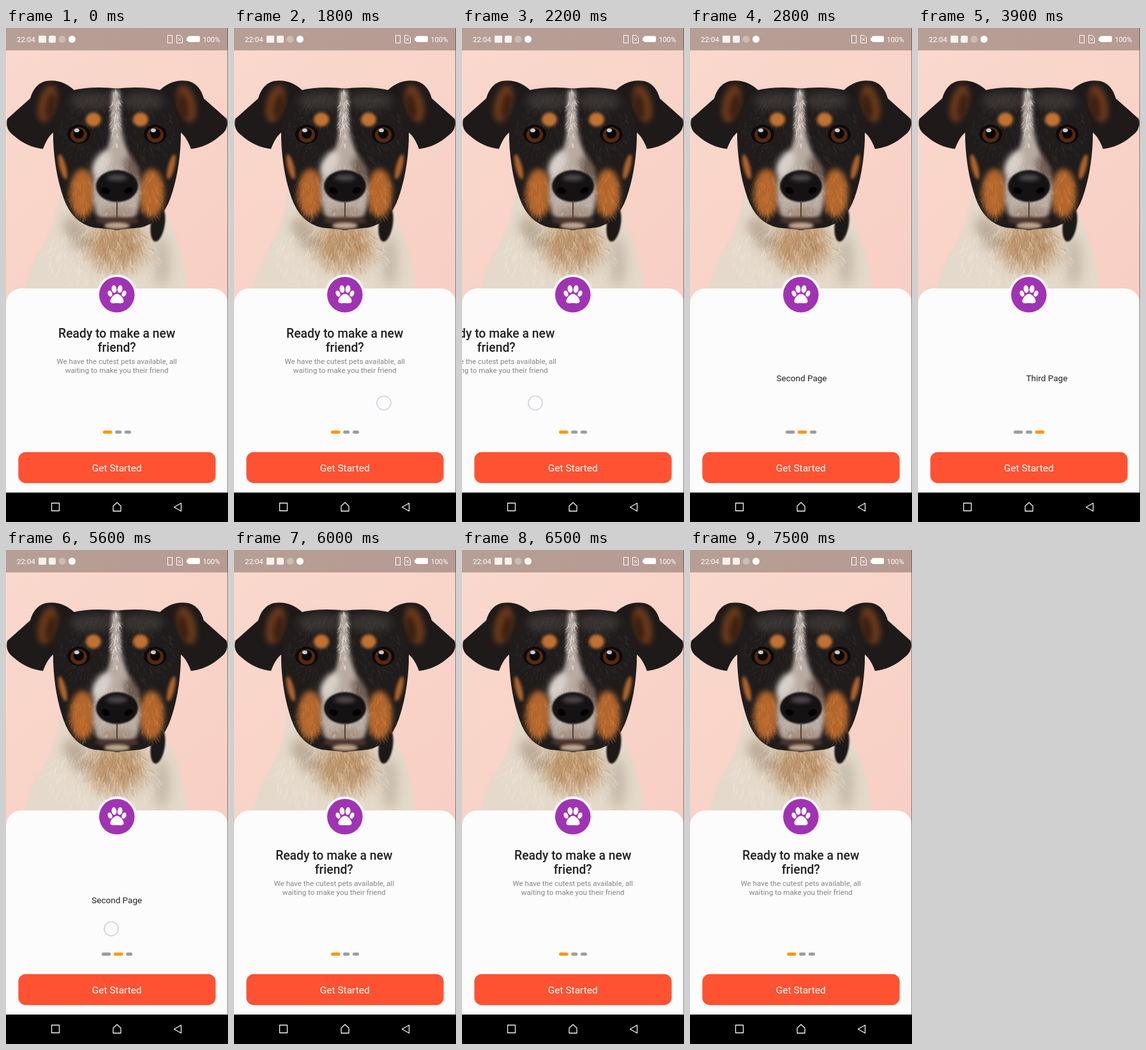
Animation, 348 px wide and 772 px high, one loop 8 s. Source, as an HTML page with a canvas:

```html
<!DOCTYPE html>
<html lang="en">
<head>
<meta charset="utf-8">
<title>Pet onboarding</title>
<style>
html, body { margin: 0; width: 100%; height: 100%; overflow: hidden; background: #000; }
canvas { display: block; width: 348px; height: 772px; }
</style>
</head>
<body>
<canvas id="stage"></canvas>
<script>
const W = 348, H = 772, MID = W / 2, LOOP = 8000;
const DP = W / 360;
const FONT = 'Roboto, Arial, sans-serif';
const INK = '#212121', PAPER = '#fcfcfc';
const dpr = window.devicePixelRatio || 1;

function setup(canvas) {
  canvas.width = W * dpr;
  canvas.height = H * dpr;
  const c = canvas.getContext('2d');
  c.scale(dpr, dpr);
  return c;
}

const ctx = setup(document.getElementById('stage'));
const backdrop = document.createElement('canvas');
const bg = setup(backdrop);

// Drag by the finger, then a spring carries the page the rest of the way
const swipes = [
  { start: 1800, stop: 2200, release: 2400, drag: 120, dir: 1, x: 235, y: 586 },
  { start: 3300, stop: 3700, release: 3700, drag: 117, dir: 1, x: 227, y: 580 },
  { start: 4600, stop: 4900, release: 4900, drag: 153, dir: -1, x: 130, y: 574 },
  { start: 5600, stop: 5800, release: 5800, drag: 209, dir: -1, x: 165, y: 592 }
];
const tap = { start: 6900, stop: 7500, x: 218, y: 698 };

const clamp = v => Math.max(0, Math.min(1, v));

function pulled(s, t) {
  return s.drag * clamp((t - s.start) / (s.stop - s.start)) ** 4;
}

function travel(s, t) {
  if (t < s.release) return pulled(s, t);
  const u = (t - s.release) / 55;
  return W - (W - s.drag) * (1 + u) * Math.exp(-u);
}

const scrollAt = t => swipes.reduce((sum, s) => sum + s.dir * travel(s, t), 0);

function oval(c, x, y, rx, ry, color, turn = 0) {
  c.fillStyle = color;
  c.beginPath();
  c.ellipse(x, y, rx, ry, turn, 0, Math.PI * 2);
  c.fill();
}

const disc = (c, x, y, r, color) => oval(c, x, y, r, r, color);

function box(c, x, y, w, h, r, color) {
  c.fillStyle = color;
  c.beginPath();
  c.roundRect(x, y, w, h, r);
  c.fill();
}

function text(c, str, x, y, size, color, weight = 400, align = 'center') {
  c.font = `${weight} ${size}px ${FONT}`;
  c.textAlign = align;
  c.fillStyle = color;
  c.fillText(str, x, y);
}

function blurred(amount, draw) {
  bg.filter = `blur(${amount * dpr}px)`;
  draw();
  bg.filter = 'none';
}

function soft(x, y, rx, ry, color, blur = 2, turn = 0) {
  blurred(blur, () => oval(bg, x, y, rx, ry, color, turn));
}

function shape(d, color, blur = 0.7) {
  blurred(blur, () => {
    bg.fillStyle = color;
    bg.fill(new Path2D(d));
  });
}

// Draws the same thing on both sides of the dog's face, x counted from the middle
function mirror(draw) {
  for (const side of [-1, 1]) {
    bg.save();
    bg.translate(MID, 0);
    bg.scale(side, 1);
    draw(side);
    bg.restore();
  }
}

let seed = 7;
function rnd() {
  seed = (seed * 16807) % 2147483647;
  return seed / 2147483647;
}

// Short hairs fanning out inside an ellipse
function fur(x, y, rx, ry, count, len, color) {
  bg.strokeStyle = color;
  bg.lineWidth = 0.8;
  for (let i = 0; i < count; i++) {
    const a = rnd() * Math.PI * 2, r = Math.sqrt(rnd());
    const px = x + Math.cos(a) * r * rx, py = y + Math.sin(a) * r * ry;
    const lean = (px - x) / rx * 0.7 + rnd() - 0.5;
    bg.beginPath();
    bg.moveTo(px, py);
    bg.lineTo(px + Math.sin(lean) * len, py + Math.cos(lean) * len);
    bg.stroke();
  }
}

function drawBody() {
  shape('M84 260 Q76 318 50 352 Q34 382 28 420 H287 Q280 350 250 290 Z', '#e4d9ca', 1.2);
  soft(MID, 340, 46, 38, '#bd956c', 12);
  soft(112, 322, 16, 30, 'rgba(150,128,104,.5)', 8, -0.6);
  soft(244, 365, 12, 40, 'rgba(160,146,130,.45)', 9);
  fur(150, 355, 90, 48, 350, 11, 'rgba(250,242,228,.35)');
  fur(MID, 340, 50, 48, 160, 10, 'rgba(130,85,48,.25)');
}

function drawEar() {
  shape('M62 102 Q84 78 112 83 Q130 88 136 110 L172 142 Q176 158 162 168 Q142 186 116 189 Q106 162 92 160 Z', '#1e1a19');
  soft(109, 118, 14, 30, '#6b3a1c', 4, -0.25);
  soft(104, 122, 7, 20, 'rgba(35,18,12,.7)', 4, -0.2);
}

function drawFace(side) {
  soft(40, 114, 34, 14, 'rgba(100,94,92,.35)', 6);
  soft(85, 217, 5, 20, '#b0642c', 2, 0.25);
  soft(54, 258, 20, 38, '#b3662c', 4);
  soft(37, 143, 12, 11, '#c07232', 2);
  oval(bg, 60, 166, 18, 15, '#0c0a0a');
  oval(bg, 60, 167, 13, 12, '#55290f');
  disc(bg, 60, 165, 8, '#090607');
  oval(bg, 60 - side * 3, 160, 4, 3, '#c4ccd6');
  fur(55, 262, 20, 38, 90, 8, 'rgba(228,150,76,.35)');
}

function drawMuzzle() {
  shape('M166 97 H178 L180 150 Q184 190 206 218 Q216 262 204 292 Q174 312 142 292 Q130 255 142 212 Q166 190 164 150 Z', '#b9aca3', 3);
  soft(150, 212, 12, 22, '#d8d0c9', 5, 0.5);
  soft(198, 222, 10, 22, 'rgba(70,48,36,.7)', 6, -0.4);
  soft(MID, 288, 28, 8, '#a58e7e', 4);
  fur(172, 140, 7, 44, 100, 7, 'rgba(250,248,245,.5)');
  fur(MID, 250, 36, 45, 130, 6, 'rgba(255,247,236,.25)');
  soft(MID, 301, 34, 6, '#4b342c', 2);
  soft(MID, 309, 20, 5, '#c2a78f', 2);
  soft(MID, 247, 33, 25, '#151214', 1.2);
  soft(MID, 234, 16, 5, 'rgba(120,112,116,.6)', 3);
  for (const side of [-1, 1]) oval(bg, MID + side * 18, 254, 7, 5, '#030203', side * -0.4);
  box(bg, MID - 1, 270, 2, 26, 1, '#54403a');
}

function drawDog() {
  drawBody();
  mirror(drawEar);
  soft(238, 306, 11, 28, '#1b1817', 1, 0.15);
  mirror(() => shape('M-4 95 Q40 90 72 98 Q102 120 100 175 Q98 225 84 265 Q70 305 36 312 L-4 316 Z', '#1f1c1b'));
  fur(MID, 160, 90, 65, 400, 7, 'rgba(120,112,110,.2)');
  mirror(drawFace);
  drawMuzzle();
}

function drawStatus() {
  bg.fillStyle = 'rgba(0,0,0,.27)';
  bg.fillRect(0, 0, W, 35);
  text(bg, '22:04', 17, 21.5, 11.6, '#fff', 400, 'left');
  box(bg, 51, 12, 12, 11, 1, '#f6f2f0');
  box(bg, 67, 12, 11, 11, 2, '#f6f2f0');
  disc(bg, 88, 17.5, 5.5, '#c9bdb2');
  disc(bg, 103.5, 17.5, 5.5, '#fff');
  bg.strokeStyle = '#fff';
  bg.lineWidth = 1;
  bg.strokeRect(253.5, 11.5, 7, 12);
  bg.stroke(new Path2D('M267.5 11.5h5.5l3.5 3.5v8.5h-9z M270 16l4 4 M274 16l-4 4'));
  box(bg, 283, 15, 2, 5, 0.5, '#fff');
  box(bg, 285, 12.5, 19, 9.5, 2, '#fff');
  text(bg, '100%', 335.5, 21.5, 11.2, '#fff', 400, 'right');
}

function drawBadge() {
  disc(bg, MID - 0.2, 416.8, 31.5, PAPER);
  disc(bg, MID - 0.2, 416.8, 27.8, '#a033b3');
  mirror(() => {
    oval(bg, 4.6, 408, 3.9, 6, '#fff', 0.15);
    oval(bg, 11, 415, 3.3, 5, '#fff', 0.4);
  });
  bg.fillStyle = '#fff';
  bg.fill(new Path2D('M174 415.5c5 0 10.5 7 10.5 11 0 5-6 3.5-10.5 3.5s-10.5 1.5-10.5-3.5c0-4 5.5-11 10.5-11z'));
}

function drawNav() {
  bg.fillStyle = '#000';
  bg.fillRect(0, 726, W, H - 726);
  bg.strokeStyle = '#f4f4f4';
  bg.lineWidth = 1.3;
  bg.lineJoin = 'round';
  bg.stroke(new Path2D('M71.5 742.5h12v12h-12z M168 747l6-5.5 6 5.5v8h-12z M274.5 742.5v12.5l-11-6.3z'));
}

function drawBackdrop() {
  const wall = bg.createLinearGradient(0, 0, W, 400);
  wall.addColorStop(0, '#fad9cd');
  wall.addColorStop(1, '#f8cfc4');
  bg.fillStyle = wall;
  bg.fillRect(0, 0, W, 440);
  drawDog();
  drawStatus();
  box(bg, 0, 407, W, 330, [24, 24, 0, 0], PAPER);
  bg.fillStyle = 'rgba(60,50,50,.6)';
  bg.fillRect(W - 1, 0, 1, 726);
  drawBadge();
  box(bg, 20 * DP, 662.8, W - 40 * DP, 50 * DP, 12 * DP, '#ff5232');
  text(bg, 'Get Started', MID - 0.3, 692.5, 16 * DP, '#fff');
  drawNav();
}

function drawPages(scroll) {
  const x = MID - 0.3 - scroll;
  ctx.save();
  ctx.beginPath();
  ctx.rect(0, 450, W - 1, 170);
  ctx.clip();
  text(ctx, 'Ready to make a new', x, 483.5, 20 * DP, INK, 500);
  text(ctx, 'friend?', x, 505.5, 20 * DP, INK, 500);
  text(ctx, 'We have the cutest pets available, all', x, 525, 12 * DP, '#858585');
  text(ctx, 'waiting to make you their friend', x, 538.5, 12 * DP, '#858585');
  text(ctx, 'Second Page', x + W, 552, 14 * DP, INK);
  text(ctx, 'Third Page', x + 2 * W, 552, 14 * DP, INK);
  ctx.restore();
}

function drawDots(page) {
  const gap = 4.6;
  // The first dot always keeps its full width
  const widths = [0, 1, 2].map(i => (i === 0 || i === page ? 15 : 10.5) * DP);
  let x = MID - (widths.reduce((a, b) => a + b) + 2 * gap) / 2;
  widths.forEach((w, i) => {
    box(ctx, x, 629, w, 5, 2.5, i === page ? '#ff9800' : '#9e9e9e');
    x += w + gap;
  });
}

function ring(x, y) {
  ctx.strokeStyle = '#d2cee4';
  ctx.lineWidth = 1.6;
  ctx.beginPath();
  ctx.arc(x, y, 11, 0, Math.PI * 2);
  ctx.stroke();
}

function drawTouch(t) {
  const s = swipes.find(o => t >= o.start && t < o.release);
  if (s) ring(s.x - s.dir * pulled(s, t), s.y);
  if (t >= tap.start && t < tap.stop) ring(tap.x, tap.y);
}

function frame() {
  // The screen refreshes ten times a second
  const t = Math.floor((performance.now() - start) % LOOP / 100) * 100;
  const scroll = scrollAt(t);
  ctx.drawImage(backdrop, 0, 0, W, H);
  drawPages(scroll);
  drawDots(Math.round(scroll / W));
  drawTouch(t);
  requestAnimationFrame(frame);
}

drawBackdrop();
const start = performance.now();
frame();
</script>
</body>
</html>
```
